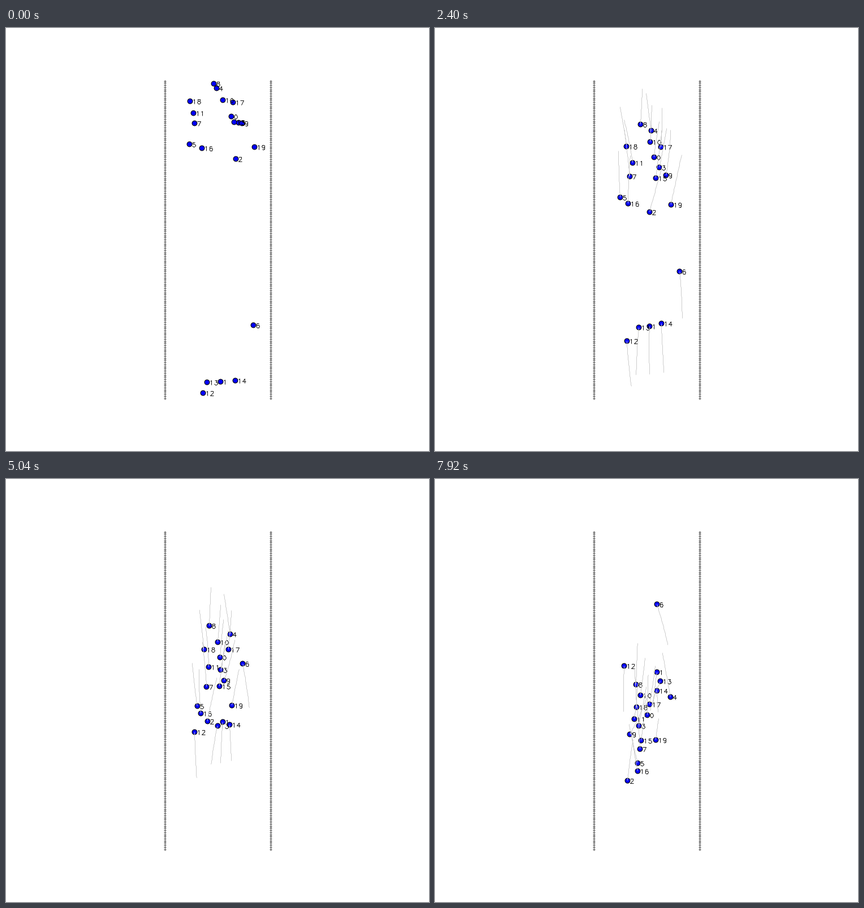
A matplotlib script for the animation above (8 s loop, 748 by 748 pixels).

```python
import numpy as np
import matplotlib.pyplot as plt
from matplotlib.animation import FuncAnimation
from matplotlib.collections import LineCollection

SIZE, DPI = 748, 64
FRAMES, INTERVAL = 100, 80
TRAIL = 25
PX = 72 / DPI

# Each walker's start, midway and end point; the walk between them is a parabola.
KEY_TIMES = [0, 54, 99]
WALKERS = np.array([
    [(398, 156), (380, 291), (375, 417)],
    [(379, 625), (381, 454), (392, 341)],
    [(406, 231), (361, 401), (340, 533)],
    [(411, 167), (384, 312), (360, 436)],
    [(372, 106), (392, 248), (416, 385)],
    [(324, 205), (334, 374), (358, 502)],
    [(437, 525), (423, 354), (392, 221)],
    [(333, 168), (352, 339), (362, 477)],
    [(367, 98), (360, 234), (355, 363)],
    [(417, 168), (393, 331), (344, 451)],
    [(383, 127), (376, 264), (363, 382)],
    [(331, 150), (357, 307), (352, 424)],
    [(348, 645), (334, 476), (334, 330)],
    [(355, 626), (369, 459), (398, 357)],
    [(405, 623), (396, 455), (392, 374)],
    [(403, 166), (380, 340), (364, 462)],
    [(346, 212), (342, 387), (358, 516)],
    [(401, 131), (395, 276), (379, 398)],
    [(325, 129), (347, 276), (356, 403)],
    [(439, 210), (403, 379), (390, 461)],
])


def walk():
    """Positions of all walkers in every frame, speeding up from rest."""
    n = np.arange(FRAMES)
    pace = n - 1.5 * (1 - np.exp(-n / 2))
    points = WALKERS.transpose(1, 0, 2).reshape(len(KEY_TIMES), -1)
    curves = np.polyfit(pace[KEY_TIMES], points, 2)
    return np.round(np.vander(pace, 3) @ curves).reshape(FRAMES, -1, 2)


def arc(cx, cy, rx, ry, start, stop):
    a = np.radians(np.linspace(start, stop, 13))
    return np.column_stack([cx + rx * np.cos(a), cy + ry * np.sin(a)])


def stroke(*parts):
    """Join glyph parts (20 x 21 units, y up) into one pixel polyline."""
    return np.round(np.vstack(parts) * (0.4, -0.4))


SIX = np.vstack([[(16, 18)], arc(11, 12, 7, 9, 70, 180), arc(10.5, 6.5, 6.5, 6.5, 180, -180)])
DIGITS = [
    stroke(arc(10, 10.5, 7, 10.5, 90, 450)),
    stroke([(6, 17), (8, 18), (11, 21), (11, 0)]),
    stroke(arc(10, 15.5, 6, 5.5, 170, -35), [(3, 0), (17, 0)]),
    stroke([(5, 21), (16, 21), (10, 13)], arc(10, 6.5, 7, 6.5, 90, -155)),
    stroke([(13, 0), (13, 21), (3, 7), (18, 7)]),
    stroke([(15, 21), (5, 21), (4, 12)], arc(10, 7, 7, 7, 130, -155)),
    stroke(SIX),
    stroke([(3, 21), (17, 21), (7, 0)]),
    stroke(arc(10, 17, 5, 4, -90, 270), arc(10, 6.5, 7, 6.5, 90, -270)),
    stroke((20, 21) - SIX),
]


def label(number, pos):
    return [DIGITS[int(c)] + pos + (4 + 8 * k, 5) for k, c in enumerate(str(number))]


fig = plt.figure(figsize=(SIZE / DPI, SIZE / DPI), dpi=DPI, facecolor="white")
ax = fig.add_axes([0, 0, 1, 1])
ax.set_xlim(-0.5, SIZE - 0.5)
ax.set_ylim(SIZE - 0.5, -0.5)
ax.axis("off")

wall_y = np.round(93.7 + 3.74 * np.arange(151))
for wall_x in (281, 468):
    ax.plot(np.full(151, wall_x), wall_y, "D", color="#808080", ms=3.3 * PX, mew=0)

dots, = ax.plot([], [], "o", ms=8.8 * PX, mfc="#0000ff", mec="black", mew=1.1 * PX, zorder=3)
labels = LineCollection([], colors="black", linewidths=0.9 * PX, zorder=4)
trails = LineCollection([], colors="#c8c8c8", linewidths=0.9 * PX, zorder=5)
ax.add_collection(labels, autolim=False)
ax.add_collection(trails, autolim=False)

paths = walk()


def update(n):
    now = paths[n]
    dots.set_data(now[:, 0], now[:, 1])
    labels.set_segments([s for i, pos in enumerate(now) for s in label(i, pos)])
    recent = paths[max(0, n - TRAIL):n + 1]
    trails.set_segments(list(recent.swapaxes(0, 1)) if n else [])
    return dots, labels, trails


anim = FuncAnimation(fig, update, frames=FRAMES, interval=INTERVAL, repeat=True, repeat_delay=0)
plt.show()
```
